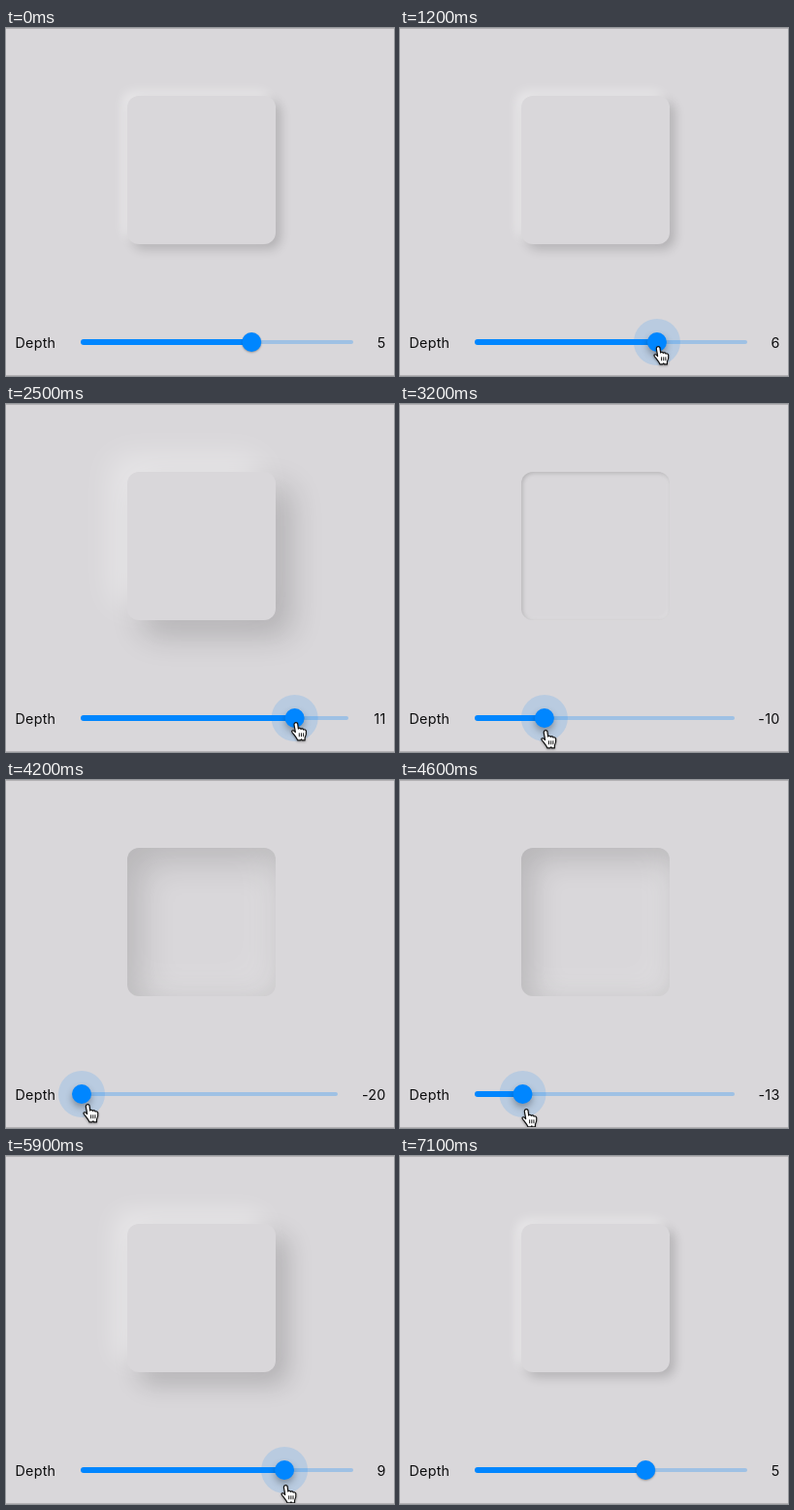
An HTML page for the animation above (7.8 s loop, 400 px wide and 359 px high).

```html
<!DOCTYPE html>
<html lang="en">
<head>
<meta charset="utf-8">
<title>Depth slider</title>
<style>
  html, body { margin: 0; width: 100%; height: 100%; overflow: hidden; background: #d9d7da; }
  #stage {
    position: relative; width: 400px; height: 359px; overflow: hidden;
    background: #d9d7da; color: #0c0c0d;
    font: 14.3px/20px Inter, Roboto, sans-serif; letter-spacing: .25px;
  }
  #stage > * { position: absolute; }
  .edge { left: 0; width: 400px; height: 1px; background: #b3b1b4; }
  #card { left: 124.5px; top: 70px; width: 153px; height: 153px; border-radius: 12px; background: #d9d7da; }
  .text { top: 315px; }
  #label { left: 9.5px; }
  #value { right: 8.5px; }
  #slider { left: 0; top: 324.4px; }
  #slider > * { position: absolute; left: 0; }
  #rest { top: -2px; height: 4px; border-radius: 0 2px 2px 0; background: rgba(0, 134, 255, .27); }
  #fill { top: -3px; height: 6px; border-radius: 3px 0 0 3px; background: #0086ff; }
  #halo, #thumb { border-radius: 50%; }
  #halo { top: -24px; width: 48px; height: 48px; margin-left: -24px; background: rgba(0, 134, 255, .15); }
  #thumb { top: -10px; width: 20px; height: 20px; margin-left: -10px; background: #0086ff; }
  #hand { left: 0; top: 0; width: 17.5px; height: 20.5px; overflow: visible; filter: drop-shadow(0 1px 1px rgba(0, 0, 0, .35)); }
</style>
</head>
<body>
<div id="stage">
  <div id="card"></div>
  <div id="label" class="text">Depth</div>
  <div id="value" class="text">5</div>
  <div id="slider">
    <div id="rest"></div>
    <div id="fill"></div>
    <div id="halo"></div>
    <div id="thumb"></div>
  </div>
  <svg id="hand" viewBox="0 0 16 19">
    <path fill="#fff" stroke="#111" stroke-width="1.1" stroke-linejoin="round"
      d="M4.5 1C5.6.8 6.4 1.6 6.5 2.7L7 7C7.4 6 9 6 9.5 7.3 10 6.6 11.6 6.7 12 8 12.7 7.3 14.3 7.8 14.5 9.2 14.8 12 14.6 13.5 13.3 15.5V18H10.5L10 17 9 18H6.3C6 16.5 4.5 15 3.5 13.3 2.7 11.8 1 11 .8 9.5.8 8.5 2.2 8.2 3.3 9.3L4.2 10.2C4 7.5 3.2 5 3 3 2.9 1.9 3.5 1.2 4.5 1Z"/>
    <path stroke="#111" stroke-width=".9" d="M7.9 11v3.6M9.9 11v3.6M11.9 11v3.6"/>
  </svg>
  <div class="edge" style="top:0"></div>
  <div class="edge" style="top:358px"></div>
</div>
<script>
const LOOP = 7800, STEP = 100, LAG = 210, MAX = 20, LEFT = 76.5;
const SHOW = 500, GRAB = 960, DROP = 6300, HIDE = 7100;
const el = id => document.getElementById(id);
const [card, value, rest, fill, halo, thumb, hand] =
  ['card', 'value', 'rest', 'fill', 'halo', 'thumb', 'hand'].map(el);

const clamp = (x, lo, hi) => Math.min(hi, Math.max(lo, x));

// Cosine-eased part of the way from t0 to t1
const ease = (t, t0, t1) => (1 - Math.cos(Math.PI * clamp((t - t0) / (t1 - t0), 0, 1))) / 2;

// The drag's turning points; it pulls past the minimum and is clamped there
function depth(t) {
  const first = 5.1 + 12.9 * ease(t, GRAB, 1985) - 42 * ease(t, 2000, 4015);
  const back = -MAX + 32.5 * ease(t, 4120, 5630) - 7.4 * ease(t, 5630, DROP);
  return clamp(t < 4100 ? first : back, -MAX, MAX);
}

// Hand's offset from the thumb: it slips left when the thumb hits its stop
const handDx = t => -4 - 13 * ease(t, 3200, 3600) + 18 * ease(t, 3600, 3800) - 5 * ease(t, 4200, 5000);

const handY = t => 350 - 22.5 * ease(t, SHOW, 1000) + 8 * ease(t, 2500, 3200)
  - 7 * ease(t, 3200, 3600) + 10 * ease(t, 3800, 4600) + 22 * ease(t, 6600, HIDE);

const textWidth = text =>
  [...text].reduce((w, c) => w + (c === '-' ? 6.3 : c === '1' ? 7 : 9.4), 0);

const shadow = (offset, blur, color, inset = '') =>
  `${inset} ${offset}px ${offset}px ${blur}px rgba(${color})`;

function relief(d) {
  const a = Math.abs(d);
  if (d >= 0) {
    return [shadow(-a, 2.1 * a, '255,255,255,.4'), shadow(a, 2.1 * a, '0,0,0,.18')].join();
  }
  const o = a * .5, blur = a * 1.9;
  return [shadow(o, blur, '0,0,0,.18', 'inset'), shadow(-o, blur, '255,255,255,.25', 'inset')].join();
}

function draw(t) {
  const v = depth(t);
  const text = String(Math.floor(v));
  const end = 367.5 - textWidth(text);
  const x = LEFT + (v + MAX) / (2 * MAX) * (end - LEFT);
  const glow = ease(t, 600, 800) - ease(t, 6700, HIDE);
  const press = ease(t, 800, 1000) - ease(t, DROP, DROP + STEP);

  value.textContent = text;
  card.style.boxShadow = relief(depth(t - LAG));
  fill.style.left = LEFT + 'px';
  fill.style.width = x - LEFT + 'px';
  rest.style.left = x + 'px';
  rest.style.width = end - x + 'px';
  halo.style.transform = `translateX(${x}px) scale(${glow})`;
  thumb.style.transform = `translateX(${x}px)`;
  thumb.style.boxShadow = `0 ${1 + 3 * press}px ${2 + 5 * press}px rgba(0,0,0,.3)`;
  hand.style.transform = `translate(${x + handDx(t)}px, ${handY(t)}px)`;
  hand.style.visibility = t >= SHOW && t < HIDE ? 'visible' : 'hidden';
}

const start = performance.now();
function tick() {
  const t = (performance.now() - start) % LOOP;
  draw(Math.floor(t / STEP) * STEP);
  requestAnimationFrame(tick);
}
tick();
</script>
</body>
</html>
```
